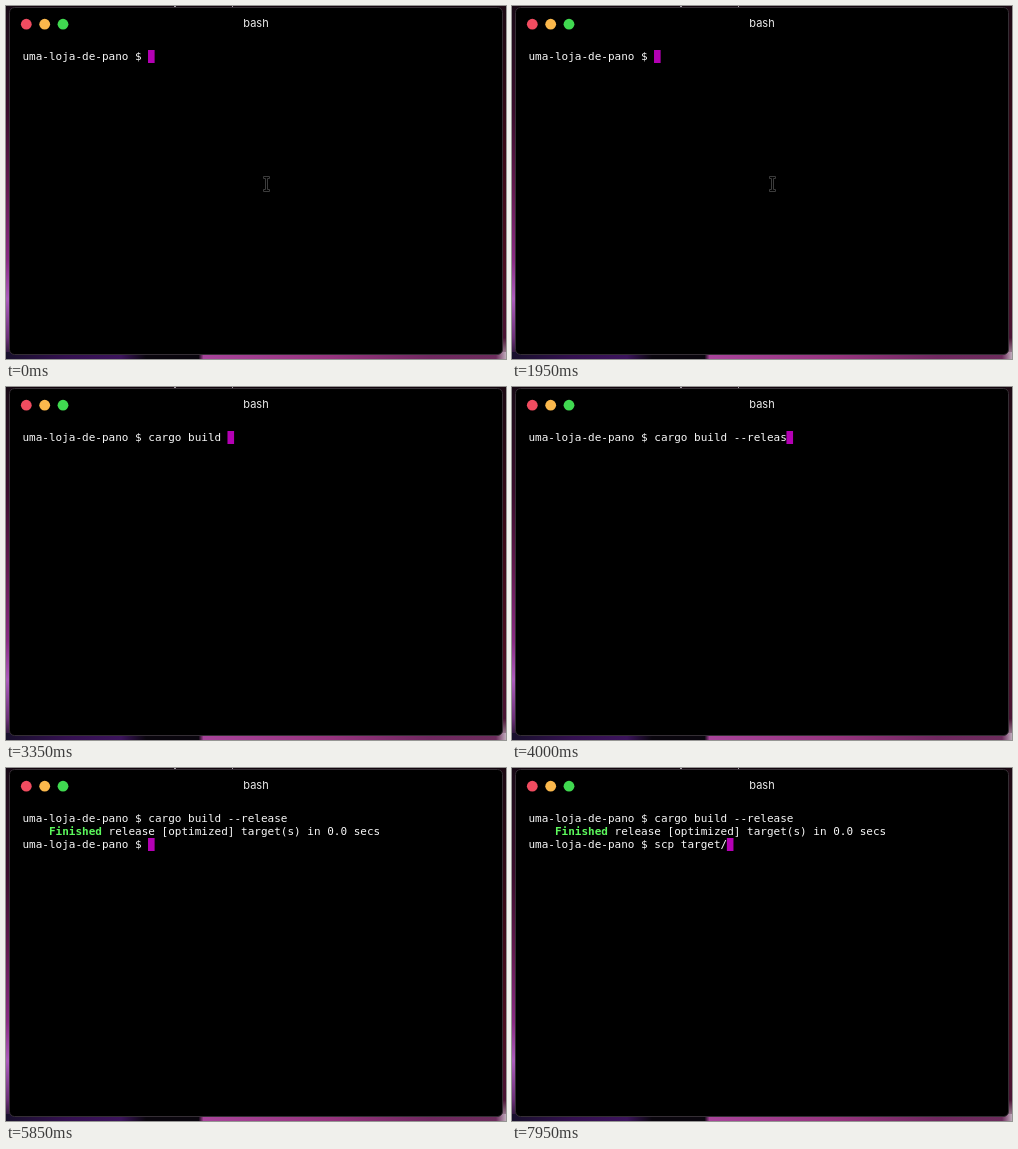
These frames come from a looping animation (500x353 px, 8 s). An HTML page:

```html
<!DOCTYPE html>
<html lang="pt">
<head>
<meta charset="utf-8">
<title>bash</title>
<style>
  html, body { margin: 0; width: 100%; height: 100%; overflow: hidden; background: #000; }
  svg { display: block; width: 500px; height: 353px; }
  .mono { font: 11px "DejaVu Sans Mono", monospace; fill: #f8f8f8; white-space: pre; }
  .title { font: 11px Inter, sans-serif; fill: #ececec; text-anchor: middle; }
  .done { font-weight: bold; fill: #5cf95c; }
</style>
</head>
<body>
<svg viewBox="0 0 500 353">
  <defs>
    <linearGradient id="left" x2="0" y2="1">
      <stop offset="0" stop-color="#180a16"/>
      <stop offset=".3" stop-color="#3a0c2c"/>
      <stop offset=".52" stop-color="#641a50"/>
      <stop offset=".72" stop-color="#8a2c84"/>
      <stop offset=".83" stop-color="#ac5cbc"/>
      <stop offset=".94" stop-color="#6c3078"/>
      <stop offset="1" stop-color="#1c1028"/>
    </linearGradient>
    <linearGradient id="right" x2="0" y2="1">
      <stop offset="0" stop-color="#1c0a14"/>
      <stop offset=".4" stop-color="#3a0a18"/>
      <stop offset=".75" stop-color="#4c0f22"/>
      <stop offset=".94" stop-color="#4a1434"/>
      <stop offset="1" stop-color="#b8a4b4"/>
    </linearGradient>
    <linearGradient id="bottom">
      <stop offset="0" stop-color="#18102c"/>
      <stop offset=".12" stop-color="#341050"/>
      <stop offset=".23" stop-color="#3c145c"/>
      <stop offset=".28" stop-color="#0a060e"/>
      <stop offset=".385" stop-color="#0a060e"/>
      <stop offset=".395" stop-color="#a8449a"/>
      <stop offset=".65" stop-color="#96347e"/>
      <stop offset=".85" stop-color="#702860"/>
      <stop offset=".98" stop-color="#6c2c5c"/>
      <stop offset="1" stop-color="#c0acbc"/>
    </linearGradient>
  </defs>
  <rect width="500" height="353" fill="#14060f"/>
  <rect width="6" height="353" fill="url(#left)"/>
  <rect x="494" width="6" height="353" fill="url(#right)"/>
  <rect y="346" width="500" height="7" fill="url(#bottom)"/>
  <path d="M168 .5h2M226 .5h1" stroke="#a8a0a8"/>
  <rect x="3.5" y="1.5" width="493" height="347" rx="5" stroke="#342e34"/>
  <circle cx="20.3" cy="18.2" r="5.4" fill="#f04c60"/>
  <circle cx="38.7" cy="18.2" r="5.4" fill="#fbb84c"/>
  <circle cx="57" cy="18.2" r="5.4" fill="#40d950"/>
  <text class="title" x="250" y="21">bash</text>

  <text class="mono" x="16.5" y="54" id="build"></text>
  <g id="output">
    <text class="mono" x="43" y="67"><tspan class="done">Finished</tspan> release [optimized] target(s) in 0.0 secs</text>
    <text class="mono" x="16.5" y="80" id="copy"></text>
  </g>
  <rect id="caret" width="6.6" height="13" fill="#b400b4"/>
  <path id="pointer" fill="none" stroke="#3c3c3c"
    d="M257.5 170.5h6v2h-2v11h2v2h-6v-2h2v-11h-2z"/>
</svg>
<script>
  const LOOP = 8000, CELL = 6.622, LEFT = 16.5;
  const PROMPT = 'uma-loja-de-pano $ ';
  const ENTER = 4350, TYPING = 2700;

  // Each run: start in ms, ms per key (0 = all at once), typed text.
  const buildRuns = [[TYPING, 58, 'cargo build '], [3450, 75, '--release']];
  const copyRuns = [[6650, 100, 'scp '], [7150, 100, 'tar'], [7550, 0, 'get/']];

  const $ = id => document.getElementById(id);

  const typed = (runs, t) => PROMPT + runs.map(([start, step, text]) => {
    if (t < start) return '';
    return step ? text.slice(0, Math.floor((t - start) / step) + 1) : text;
  }).join('');

  function draw(t) {
    const entered = t >= ENTER;
    const build = typed(buildRuns, t), copy = typed(copyRuns, t);
    $('build').textContent = build;
    $('copy').textContent = copy;
    $('output').style.display = entered ? '' : 'none';
    $('pointer').style.display = t < TYPING ? '' : 'none';
    $('caret').setAttribute('x', LEFT + CELL * (entered ? copy : build).length - 0.3);
    $('caret').setAttribute('y', entered ? 70 : 44);
  }

  const origin = performance.now();
  function tick() {
    draw((performance.now() - origin) % LOOP);
    requestAnimationFrame(tick);
  }
  tick();
</script>
</body>
</html>
```
